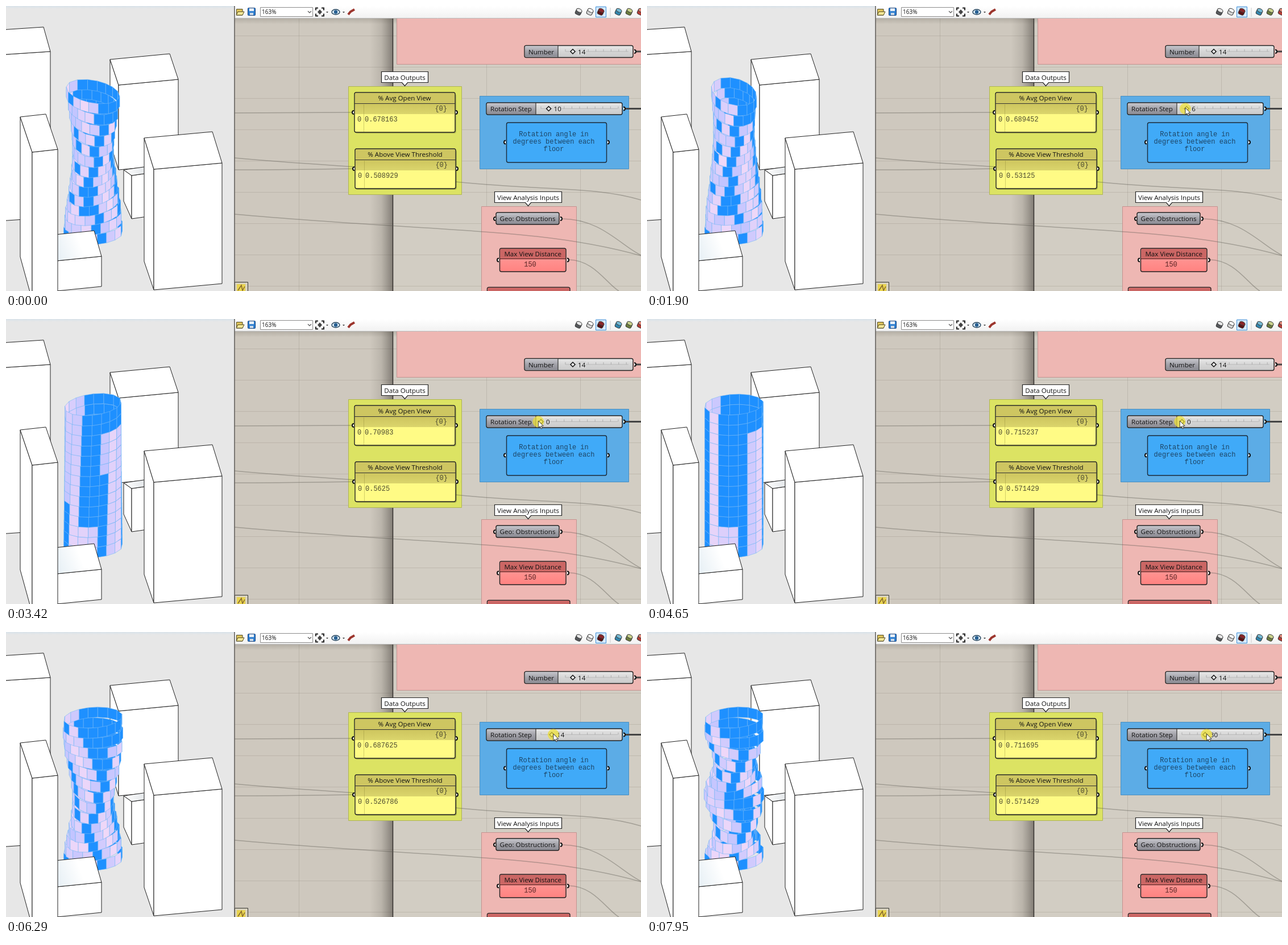
An HTML page with a canvas for the animation above (8000 ms loop, 1117 by 501 pixels).

```html
<!DOCTYPE html>
<html lang="en">
<head>
<meta charset="utf-8">
<title>Tower view study</title>
<style>
html,body{margin:0;width:100%;height:100%;overflow:hidden;background:#e7e7e7}
canvas{display:block}
</style>
</head>
<body>
<canvas id="stage" width="1117" height="501"></canvas>
<script>
const c = document.getElementById('stage').getContext('2d');
const LOOP = 8000, RAD = Math.PI / 180;
const UI = '11.6px "Open Sans", "Noto Sans", sans-serif';
const MONO = '12px "Liberation Mono", "DejaVu Sans Mono", monospace';
const INK = '#222';

// rotation step, average open view, panels above the threshold
const RESULTS = [[0,.715237,128],[6,.682795,116],[9,.69278,121],[10,.678163,114],[14,.687625,118],[20,.676812,113],[28,.711695,128]];
// facing angle, half width, floors blocked
const BLOCKERS = [[160,46,14],[237,22,14],[318,22,12],[268,16,3]];

// ---- motion ----
const part = (t, from, to) => Math.min(1, Math.max(0, (t - from) / (to - from)));

// The label runs a little ahead of the rebuilt tower.
function knobValue(t) {
  if (t < 690) return 10;
  if (t < 4650) return 9.4 * (1 - part(t, 690, 3020) ** 1.8);
  return 30 * part(t, 4650, 7950) ** 1.05;
}
function towerStep(t) {
  if (t < 690) return 10;
  if (t < 4650) return Math.round(9.4 * (1 - part(t, 690, 3490) ** 2.5));
  return Math.round(28 * part(t, 4650, 7950));
}
function pointerX(t) {
  if (t < 690) return 960 - 9 * part(t, 70, 270);
  const idle = Math.sin(Math.PI * part(t, 3300, 4650));
  return 938 + 1.36 * knobValue(t) - 12 * idle + 6 * part(t, 4650, 5500);
}
function results(step) {
  const i = Math.max(1, RESULTS.findIndex(r => step <= r[0]));
  const a = RESULTS[i - 1], b = RESULTS[i], p = part(step, a[0], b[0]);
  const mix = k => a[k] + (b[k] - a[k]) * p;
  return [mix(1), Math.round(mix(2)) / 224].map(v => String(+v.toFixed(6)));
}

// ---- drawing helpers ----
function paint(fill, line, width = 1) {
  if (fill) { c.fillStyle = fill; c.fill(); }
  if (line) { c.strokeStyle = line; c.lineWidth = width; c.stroke(); }
}
function poly(pts, fill, line, width) {
  c.beginPath();
  for (let i = 0; i < pts.length; i += 2) c.lineTo(pts[i], pts[i + 1]);
  c.closePath();
  paint(fill, line, width);
}
function path(pts, color, width) {
  c.beginPath();
  for (let i = 0; i < pts.length; i += 2) c.lineTo(pts[i], pts[i + 1]);
  paint(null, color, width);
}
function box(x, y, x2, y2, fill, line, r = 0, width = 1) {
  c.beginPath();
  c.roundRect(x, y, x2 - x, y2 - y, r);
  paint(fill, line, width);
}
function disc(x, y, r, fill) {
  c.beginPath();
  c.arc(x, y, r, 0, 7);
  paint(fill);
}
function fade(x, y, x2, y2, ...colors) {
  const g = c.createLinearGradient(x, y, x2, y2);
  colors.forEach((k, i) => g.addColorStop(i / (colors.length - 1), k));
  return g;
}
const down = (y, y2, ...colors) => fade(0, y, 0, y2, ...colors);
function text(s, x, y, font = UI, align = 'center', color = '#111') {
  c.font = font;
  c.textAlign = align;
  c.fillStyle = color;
  c.fillText(s, x, y);
}

// ---- city view ----
// Roof corner, roof vectors to the right and to the front, wall heights.
function block(x, y, rx, ry, fx, fy, left, front, roof = '#fff') {
  const x1 = x + fx, y1 = y + fy, x2 = x1 + rx, y2 = y1 + ry;
  poly([x,y, x1,y1, x1,y1+front, x,y+left], '#fff', INK);
  poly([x1,y1, x2,y2, x2,y2+front, x1,y1+front], '#fff', INK);
  poly([x,y, x+rx,y+ry, x2,y2, x1,y1], roof, INK);
}
function backCity() {
  box(0, 0, 402, 501, '#e7e7e7');
  box(0, 0, 402, 5, down(0, 5, '#d9e3ea', '#e7e7e7'));
  block(-40, 44, 106, -7, 12, 43, 292, 292);
  block(183, 94, 105, -10, 15, 45, 146, 149);
  block(207, 288, 42, -6, 14, 10, 55, 76, fade(207, 0, 250, 0, '#fff', '#dfe3e6'));
  block(243, 232, 120, -11, 17, 55, 217, 212);
}
function frontCity() {
  block(76, 403, 79, -8, 13, 45, 53, 53, fade(88, 425, 128, 410, '#e9f1f6', '#fff'));
  block(25, 195, 45, -5, 21, 62, 246, 260);
}

function panelColor(facing, floor) {
  for (const [mid, half, floors] of BLOCKERS) {
    const near = 1 - Math.abs(facing - mid) / half;
    if (near > 0 && floor < floors)
      return `rgb(${194 + 46 * near},${196 + 20 * near},${255 - 7 * near})`;
  }
  return '#1e90ff';
}

// Fourteen elliptical rings, each turned by one more step.
function tower(step) {
  const a = 52.5, b = 36, tall = 17.93, sides = 16;
  const even = j => { const s = j * 2 * Math.PI / sides; return s + .09 * Math.sin(2 * s); };
  for (let floor = 0; floor < 14; floor++) {
    const base = 401.5 - floor * tall, turn = (12 + floor * step) * RAD;
    const cos = Math.cos(turn), sin = Math.sin(turn);
    const spot = j => {
      const u = a * Math.cos(even(j)), v = b * Math.sin(even(j));
      return [153 + u * cos - v * sin, base - .5 * (u * sin + v * cos)];
    };
    const back = [], front = [];
    for (let j = 0; j < sides; j++) {
      const t = even(j + .5);
      const face = Math.atan2(a * Math.sin(t), b * Math.cos(t)) + turn;
      const [x, y] = spot(j), [x2, y2] = spot(j + 1);
      const color = panelColor(((face / RAD) % 360 + 360) % 360, floor);
      (Math.sin(face) > 0 ? back : front).push([[x,y, x2,y2, x2,y2-tall, x,y-tall], color]);
    }
    for (const [pts, color] of [...back, ...front]) poly(pts, color, 'rgba(120,185,245,.75)', .8);
  }
}

// ---- node canvas ----
function wire(x, y, x2, y2, bend = 0) {
  const dx = (x2 - x) / 2;
  c.beginPath();
  c.moveTo(x, y);
  c.bezierCurveTo(x + dx, y + bend, x2 - dx / 2, y2 - (y2 - y) / 4 - bend, x2, y2);
  paint(null, 'rgba(90,88,82,.4)', 1.5);
}
function nub(x, y, side) {
  c.beginPath();
  c.arc(x, y, 3, side * Math.PI / 2, side * Math.PI * 1.5);
  paint('#fff', '#111', 2);
}
function nubs(x, x2, y) { nub(x, y, 1); nub(x2, y, -1); }

function tag(s, x, y, x2) {
  const m = (x + x2) / 2, b = y + 19;
  poly([x,y, x2,y, x2,b, m+5,b, m,b+6, m-5,b, x,b], '#fff', INK, 1.2);
  text(s, m, y + 14);
}
const steel = (y, y2) => down(y, y2, '#c9c9cf', '#a2a2a9', '#8a8a92');

function slider(label, x, x2, split, y, zero, gap, knob, value) {
  const mid = y + 10.5, s = String(value);
  box(x, y, x2, y + 21, down(y, y + 21, '#e9e9e9', '#d6d6d6', '#cacaca'), INK, 3, 1.4);
  box(x + 1, y + 1, split, y + 20, steel(y, y + 21));
  path([split, y, split, y + 21], '#333', 1.2);
  text(label, (x + split) / 2, y + 15);
  path([zero, mid, x2 - 8, mid], '#b9b9b9');
  for (let tx = zero; tx < x2 - 5; tx += gap) path([tx, mid - 4, tx, mid], '#adadad');
  box(knob + 7, mid - 6, knob + 10 + 6.5 * s.length, mid + 6, '#d6d6d6');
  poly([knob,mid-4, knob+4,mid, knob,mid+4, knob-4,mid], '#f5f5f5', '#111', 1.5);
  text(s, knob + 9, mid + 4.5, UI, 'left');
  path([x2 + 3, mid, 1117, mid], '#444', 3);
  nub(x2 + 2, mid, -1);
}
function panel(title, x, y, value) {
  const x2 = x + 177, ink = '#4c4a30';
  box(x + 1, y + 2, x2 + 2, y + 72, 'rgba(0,0,0,.22)', null, 4);
  box(x, y, x2, y + 70, '#fffb85', INK, 3, 1.4);
  box(x + 1, y + 1, x2 - 1, y + 19, '#cec661');
  box(x + 1, y + 20, x2 - 1, y + 38, down(y + 20, y + 38, '#cdc55e', '#dbd56c'));
  path([x, y + 19.5, x2, y + 19.5], '#333', 1.2);
  path([x + 16.5, y + 21, x + 16.5, y + 69], 'rgba(130,125,50,.35)');
  text(title, x + 88, y + 14);
  text('{0}', x + 163, y + 32, MONO, 'right', ink);
  text('0', x + 5, y + 51, MONO, 'left', ink);
  text(value, x + 18, y + 51, MONO, 'left', ink);
  nubs(x - 1, x2 + 1, y + 35);
}
function redHead(title, x, y, x2) {
  box(x, y, x2, y + 41, down(y + 19, y + 41, '#ff9391', '#ff8280'), INK, 3, 1.4);
  box(x + 1, y + 1, x2 - 1, y + 18, '#cb6664');
  path([x, y + 18.5, x2, y + 18.5], '#4b2020', 1.2);
  text(title, (x + x2) / 2, y + 14);
}

function drum(x, dark, light) {
  c.save();
  c.translate(x, 10.5);
  c.rotate(.45);
  box(-5, -5, 5, 5, dark, '#333', 3);
  c.beginPath();
  c.ellipse(0, -3, 5, 3, 0, 0, 7);
  paint(light, '#444');
  c.restore();
}
function toolbar() {
  box(402, 0, 1117, 22, down(0, 22, '#fff', '#f1f1f1'));
  path([402, 21.5, 1117, 21.5], '#bbb');
  box(405.5, 5.5, 416, 16, '#e1c65c', '#4c451c');
  poly([408,10, 419,10, 416,16, 405,16], '#f6e797', '#4c451c');
  box(425.5, 3.5, 438.5, 16.5, '#2f7fd0', '#173f78', 1);
  box(428, 4, 436, 9, '#e6eef6');
  box(429, 12, 435, 16, '#cfdbe8');
  box(447.5, 2.5, 539.5, 18.5, '#fff', '#8b8b8b');
  text('163%', 450, 14, '10px "Open Sans", "Noto Sans", sans-serif', 'left');
  path([531,9, 534,12, 537,9], '#555', 1.2);
  for (const sx of [-1, 1]) for (const sy of [-1, 1])
    path([552+sx*7,10.5+sy*3, 552+sx*7,10.5+sy*7, 552+sx*3,10.5+sy*7], INK, 2);
  poly([552,6, 556,10.5, 552,15, 548,10.5], '#444');
  for (const x of [565, 594]) poly([x-2,10, x+2,10, x,12], INK);
  c.beginPath();
  c.ellipse(580, 10.5, 7, 4.5, 0, 0, 7);
  paint('#dceaf4', '#26465f', 1.4);
  disc(580, 10.5, 3.2, '#265f92');
  path([602,15, 606,10, 613,6], '#9c352d', 4);
  box(1037.5, 1.5, 1055.5, 19.5, '#d6e9fa', '#3d8fd9');
  drum(1007, '#55585b', '#e9e9e9');
  drum(1027, '#d5d5d5', '#fff');
  drum(1046, '#5d1114', '#8c2529');
  path([1063, 3, 1063, 19], '#ccc');
  drum(1077, '#3186ae', '#77bbd5');
  drum(1096, '#6c7c3d', '#c9d28c');
  drum(1116, '#b53d36', '#e49081');
}

function sheet() {
  box(402, 0, 1117, 501, '#d2cdc3');
  box(402, 22, 681, 501, '#cec8be');
  const grid = 'rgba(130,124,112,.25)';
  for (let x = 515.5; x < 1117; x += 165) path([x, 22, x, 501], grid);
  for (let y = 52.5; y < 501; y += 55) path([402, y, 1117, y], grid);
  box(640, 22, 680, 501, fade(640, 0, 680, 0, 'rgba(70,65,58,0)', 'rgba(70,65,58,.14)', 'rgba(60,55,50,.5)'));
  path([680.5, 22, 680.5, 501], '#35322f', 1.5);
  box(402, 22, 1117, 32, down(22, 32, 'rgba(80,75,65,.2)', 'rgba(80,75,65,0)'));

  box(687.5, 10, 1125, 102.5, '#eeb7b3', '#c49390');
  box(602.5, 141.5, 801.5, 331.5, '#dce363', '#aeb455');
  box(833.5, 158.5, 1095.5, 286.5, '#5cace6', '#4a8fc0');
  box(836.5, 352.5, 1003.5, 510, '#eeb7b3', '#c49390');

  wire(402, 188, 610, 187);
  wire(402, 288, 611, 286);
  wire(402, 267, 790, 309, 18);
  wire(790, 309, 1117, 341, 16);
  wire(402, 366, 1117, 439, 32);
  wire(977, 374, 1117, 438);
  wire(989, 446, 1078, 501);
}

function nodeCanvas(step, value) {
  const shown = step && value < 4.6 ? Math.round(value) : Math.floor(value + .3 * (value < 9.5 && value > 8.6));
  const [avg, above] = results(step);
  sheet();
  slider('Number', 912, 1103, 971, 69.5, 984, 13.4, 997, 14);
  slider('Rotation Step', 845, 1084, 932, 170, 941, 13.6, 941 + 1.36 * shown, shown);

  tag('Data Outputs', 660.5, 115.5, 742.5);
  panel('% Avg Open View', 613, 152, avg);
  panel('% Above View Threshold', 614, 251, above);

  box(880.5, 205, 1056.5, 275, '#40aaf8', '#1b2a38', 3, 1.4);
  ['Rotation angle in', 'degrees between each', 'floor'].forEach((s, i) =>
    text(s, 963.5, 229 + i * 13.2, MONO, 'center', '#1d4566'));
  nubs(879, 1058, 239.5);

  tag('View Analysis Inputs', 859.5, 326.5, 977.5);
  box(862, 363, 973, 384, steel(363, 384), INK, 3, 1.4);
  text('Geo: Obstructions', 917.5, 378);
  nubs(861, 975, 374);
  redHead('Max View Distance', 868.5, 426, 985);
  text('150', 922, 458, MONO, 'center', '#5a2626');
  nubs(867, 987, 446.5);
  redHead('View Distance Threshold', 846.5, 494.5, 992);

  toolbar();
  box(402.5, 485.5, 425.5, 505, '#d8d2bd', '#333');
  box(406, 489, 421, 501, '#e9d44f');
  path([408,500, 414,491, 416,500, 420,493], '#86682d', 1.5);
  path([402, 0, 402, 501], '#5b5955', 1.5);
}

function pointer(t) {
  if (t < 70) return;
  const x = pointerX(t), y = 179;
  if (t >= 470) disc(x, y + 1.5, 10, 'rgba(238,224,52,.72)');
  poly([x,y, x,y+12, x+3,y+9.5, x+5,y+14, x+7,y+13, x+5,y+9, x+9,y+9], '#fff', INK, .9);
}

function draw(t) {
  const tick = Math.floor(t / 70) * 70;
  backCity();
  tower(towerStep(t));
  frontCity();
  nodeCanvas(towerStep(t), knobValue(t));
  pointer(tick);
}

const start = performance.now();
function loop() {
  draw((performance.now() - start) % LOOP);
  requestAnimationFrame(loop);
}
loop();
</script>
</body>
</html>
```
